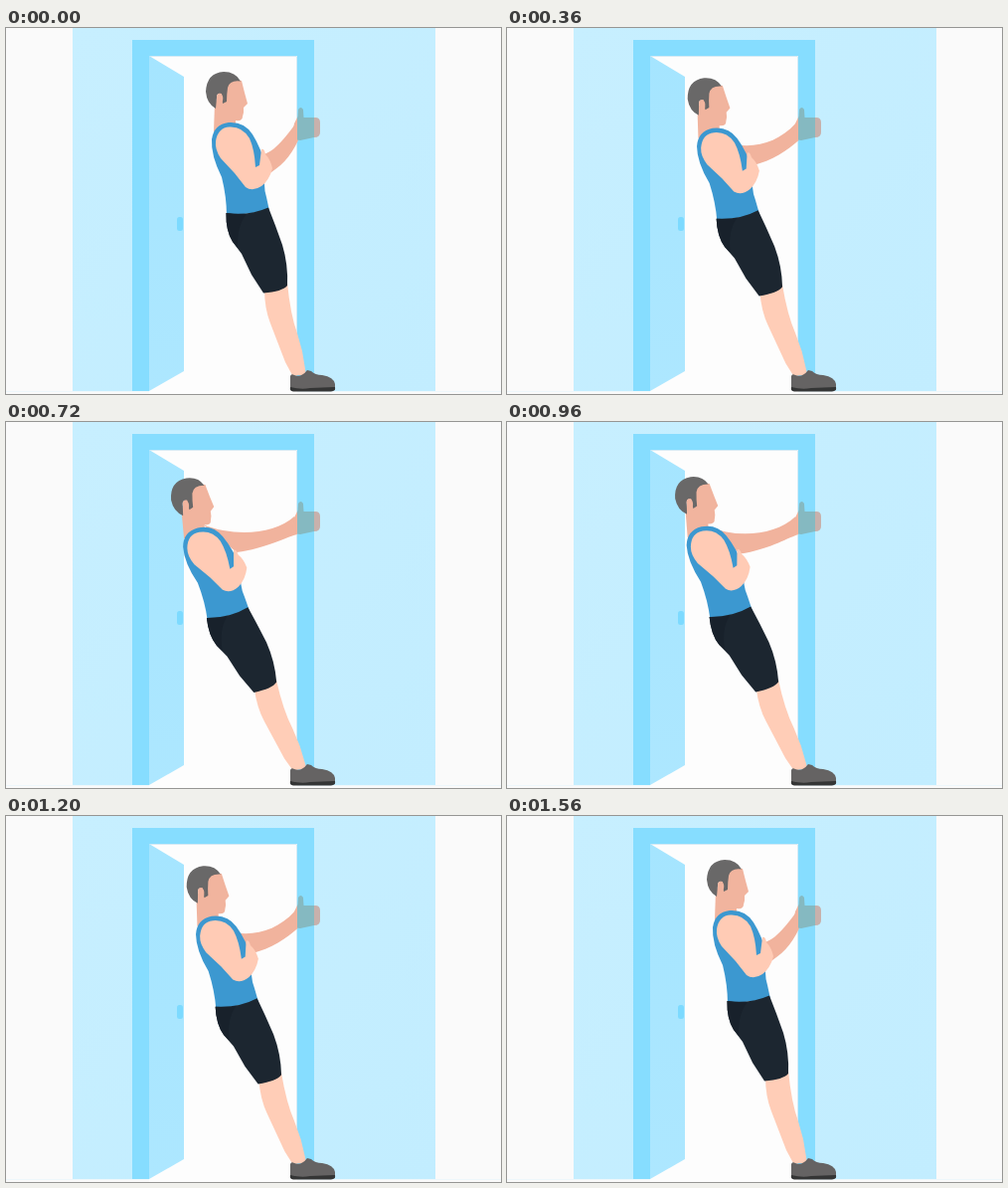
Write an HTML page that moves like this. It is 498 by 368 pixels and loops after 1680 ms.

```html
<!DOCTYPE html>
<html lang="en">
<head>
<meta charset="utf-8">
<title>Doorway stretch</title>
<style>
html, body { margin: 0; width: 100%; height: 100%; overflow: hidden; background: #fafafa; }
svg { display: block; width: 498px; height: 368px; }
</style>
</head>
<body>
<svg viewBox="0 0 498 368">
  <defs>
    <linearGradient id="wall" x1="0" y1="0" x2="1" y2="1">
      <stop offset="0" stop-color="#c7efff"/>
      <stop offset="1" stop-color="#c2edff"/>
    </linearGradient>
    <linearGradient id="door" x1="0" y1="0" x2="0" y2="1">
      <stop offset="0" stop-color="#a5e5ff"/>
      <stop offset="1" stop-color="#ade7ff"/>
    </linearGradient>
    <clipPath id="fist">
      <path d="M288 106 L290 96 L293.5 89 L294 82 Q296.500 78 299 82 L299.500 90 L311 90 Q316 90 316 95 V105 Q316 110 310 110 L296 113 L289 112 Z"/>
    </clipPath>
  </defs>

  <!-- room -->
  <rect x="67" width="365" height="365" fill="url(#wall)"/>
  <path d="M0 365.500 H498" stroke="#eef7fb"/>
  <rect x="127" y="12" width="183" height="353" fill="#86ddff"/>
  <rect x="144" y="28" width="149" height="340" fill="#fdfdfd"/>
  <path d="M144 28.500 H292.500 V365" fill="none" stroke="#d6ebf5"/>
  <path d="M144 28 L179 49 V345 L144 365 Z" fill="url(#door)"/>
  <rect x="172" y="190" width="6" height="14" rx="2.500" fill="#7ddaff"/>

  <!-- supporting arm and hand -->
  <path id="arm" fill="#f1b39d"/>
  <g clip-path="url(#fist)">
    <rect x="280" y="75" width="13" height="40" fill="#f1b39d"/>
    <rect x="293" y="75" width="17" height="40" fill="#85b9c1"/>
    <rect x="310" y="75" width="10" height="40" fill="#c8b1ac"/>
  </g>

  <g id="body">
    <!-- leg -->
    <path d="M260 262 Q260 282 266 297 L281 336 L288 349 H302 L298 325 L293 307 Q286 288 283 256 Z" fill="#ffcdb7"/>
    <!-- head -->
    <path d="M210 76 L209 104 Q222 108 240 100 L231 96 L231 93 Q238 94 238 89 L239 85 L239 80 L243 76 L240 65 L237 53 L222 50 Z" fill="#f1b49e"/>
    <path d="M211 81 Q202 76 201 64 Q202 45 219 44 Q231 44 236 53.500 Q225 52 223 60 Q222 67 222 74 L218 76 L217 66 Q212 65 212 70 Z" fill="#696868"/>
    <path d="M212 70 Q212 65 216 66 Q219 68 218 73 Q216 77 213 75 Z" fill="#f1b49e"/>
    <!-- vest -->
    <path d="M207 112 Q209 97 224 95 Q240 94 248 107 Q257 121 262 142 Q258 158 262 170 L265 184 L222 189 Q222 170 217 150 Q206 128 207 112 Z" fill="#3c98d0"/>
    <!-- shorts -->
    <path d="M221.500 186 Q245 189 264 180.500 Q271 198 278 218 Q284 238 283 259 Q278 265 259 266.500 L247 248 L237 227 L228 215 Q221 204 221.500 186 Z" fill="#1c2630"/>
    <path d="M221.500 186 Q234 188 242 187 Q232 199 233 221 L228 215 Q221 204 221.500 186 Z" fill="#18212b"/>
    <!-- folded arm -->
    <path d="M211 114 Q213 100 225 99.500 Q238 99 245 111 Q250 122 251 140 L255 138 L257 122 Q260 121 261 127 Q266 132 268 141 Q265 153 257 159 Q248 165 241 160 L230 146 L216 131 Q210 122 211 114 Z" fill="#ffcbb5"/>
  </g>

  <!-- shoe -->
  <path d="M286 364 V350 Q287 347 290 349 Q297 352 303 344 L307 345 Q311 349 318 349 Q330 351 331 358 V364 Z" fill="#656363"/>
  <path d="M286 361 Q297 364 306 362 L331 361 Q332 365 327 365.500 H289 Q285 365 286 361 Z" fill="#343535"/>
</svg>
<script>
const STEP = 120, COUNT = 14, RATE = .182, TILT = -7.3;

// arm outline as an upper and a lower curve, at both ends of the sway
const bent = 'M240 128 C262 132 272 122 290 98 L294 113 C286 130 276 140 262 148 Z';
const straight = 'M198 103 C230 116 270 113 290 95 L293 113 C278 117 262 127 232 131 Z';

const arm = document.getElementById('arm');
const body = document.getElementById('body');

function blend(a, b, k) {
  const ends = b.match(/\d+/g);
  let i = 0;
  return a.replace(/\d+/g, n => +n + (ends[i++] - n) * k);
}

// steady lean out and back, held for a moment at full stretch
function lean(ms) {
  const i = Math.floor(ms / STEP) % COUNT;
  return Math.min(1, RATE * Math.min(i, COUNT - 1 - i));
}

function draw(ms) {
  const p = lean(ms);
  body.setAttribute('transform', `rotate(${TILT * p} 298 345)`);
  arm.setAttribute('d', blend(bent, straight, p));
}

const start = performance.now();
function tick() {
  draw(performance.now() - start);
  requestAnimationFrame(tick);
}
tick();
</script>
</body>
</html>
```
